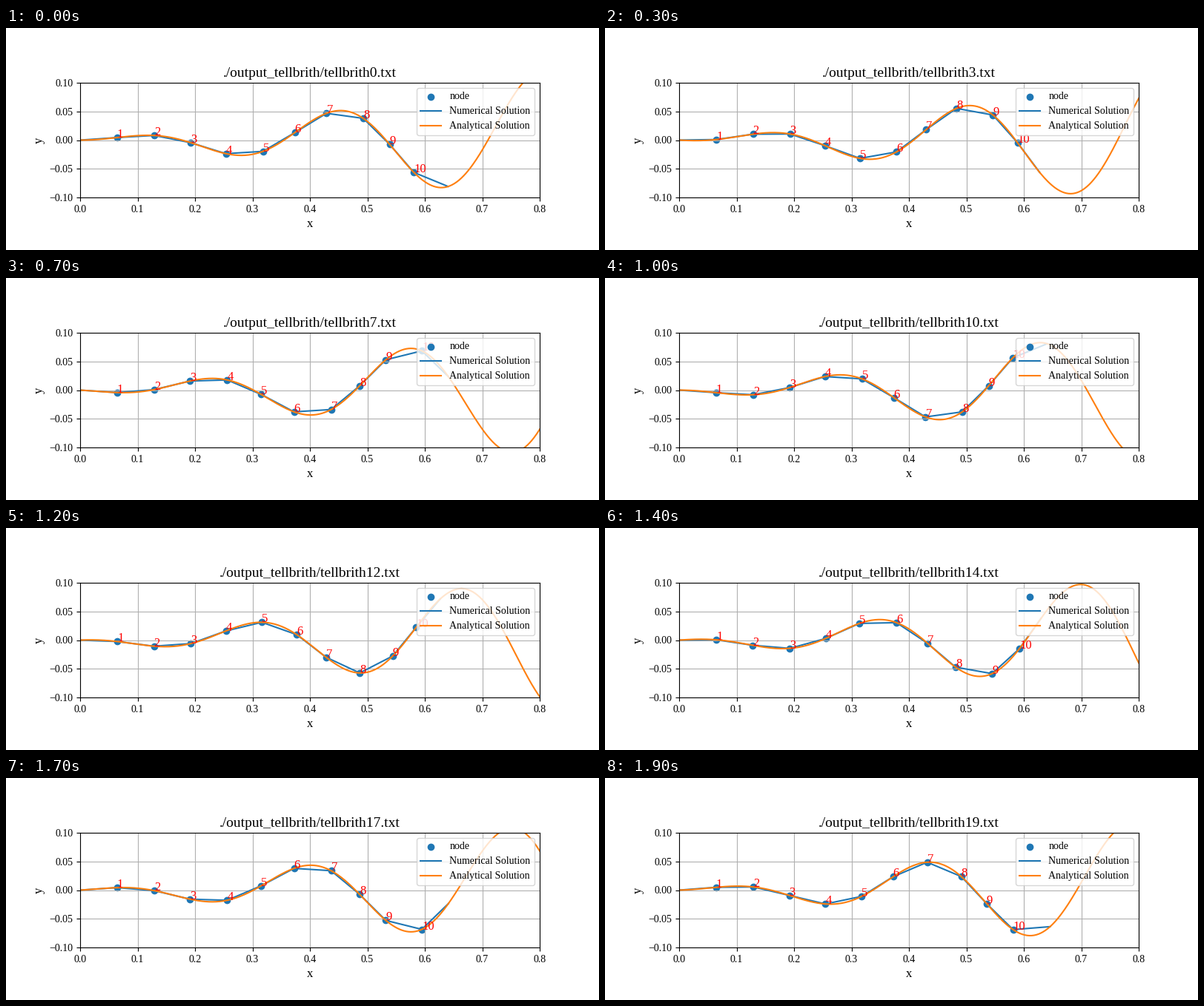
Recreate the animation shown at these times as a matplotlib script. Size 800x300 px, loop 2 s.

```python
import numpy as np
import matplotlib.pyplot as plt
from matplotlib.animation import FuncAnimation

plt.rcParams["font.family"] = "Liberation Serif"

FRAMES = 20
INTERVAL = 100
NODES = 10
LINK = 0.71 / 11
WAVE = 17.7


def body(x, phase):
    """Travelling wave whose envelope grows towards the tail."""
    return (0.07 * x + 0.1 * x**2) * np.sin(WAVE * x - phase)


def next_joint(x0, phase):
    """Abscissa of the curve point one rigid link away from x0."""
    y0 = body(x0, phase)
    lo, hi = x0, x0 + LINK
    for _ in range(40):
        mid = (lo + hi) / 2
        if np.hypot(mid - x0, body(mid, phase) - y0) < LINK:
            lo = mid
        else:
            hi = mid
    return lo


def joints(phase):
    xs = [0.0]
    for _ in range(NODES + 1):
        xs.append(next_joint(xs[-1], phase))
    xs = np.array(xs)
    return xs, body(xs, phase)


fig, ax = plt.subplots(figsize=(8, 3), dpi=100)
ax.set_aspect("equal")
ax.set_xlim(0, 0.8)
ax.set_ylim(-0.1, 0.1)
ax.set_xticks(np.arange(9) / 10)
ax.set_yticks(np.arange(-2, 3) / 20)
ax.set_xlabel("x", fontsize=12)
ax.set_ylabel("y", fontsize=12)
ax.grid(True)

grid_x = np.linspace(0, 0.8, 400)
dots = ax.scatter(np.zeros(NODES), np.zeros(NODES), color="C0", label="node")
chain, = ax.plot([], [], color="C0", label="Numerical Solution")
curve, = ax.plot([], [], color="C1", label="Analytical Solution")
tags = [ax.text(0, 0, str(i + 1), color="red", fontsize=12) for i in range(NODES)]
title = ax.set_title("", fontsize=14)
ax.legend(handles=[dots, chain, curve], loc="upper right")


def update(n):
    phase = 2 * np.pi * n / FRAMES
    xs, ys = joints(phase)
    chain.set_data(xs, ys)
    curve.set_data(grid_x, body(grid_x, phase))
    inner = np.column_stack([xs, ys])[1:-1]
    dots.set_offsets(inner)
    for tag, point in zip(tags, inner):
        tag.set_position(point)
    title.set_text(f"./output_tellbrith/tellbrith{n}.txt")
    return [dots, chain, curve, title, *tags]


anim = FuncAnimation(fig, update, frames=FRAMES, interval=INTERVAL,
                     init_func=lambda: update(0), repeat=True, repeat_delay=0)
plt.show()
```
